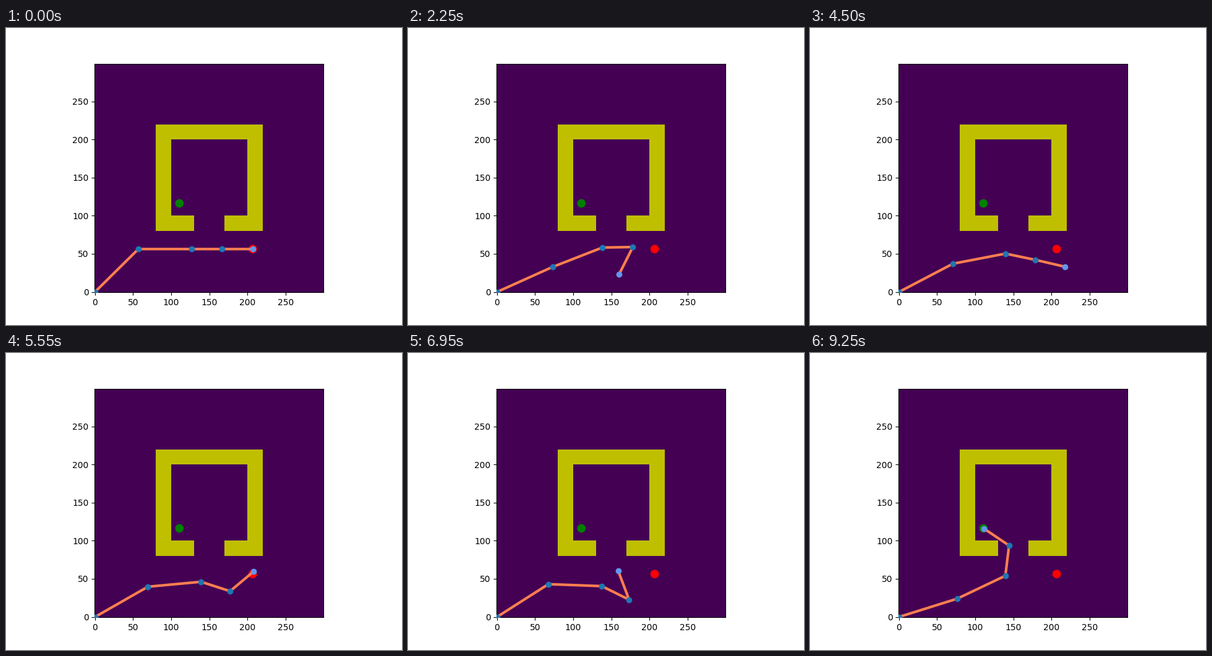
Animation, 640 px wide and 480 px high, one loop 9300 ms. Source, as a matplotlib script:

```python
import numpy as np
import matplotlib.pyplot as plt
from matplotlib.animation import FuncAnimation
from matplotlib.patches import Circle, Rectangle

FRAMES = 186
INTERVAL = 50
SIZE = 300
LINKS = np.array([80, 70, 40, 40])

# Waypoints in joint space: radians, each joint relative to the one before
WAYPOINTS = np.array([
    [0.78, -0.78, 0, 0],
    [0.407, -0.019, -0.370, -2.143],
    [0.572, -0.620, -0.424, 2.512],
    [0.304, 0.140, 1.005, 1.100],
])
GOAL = (110.8, 116.2)

# Distance travelled at each waypoint, so the arm moves at constant speed
steps = np.linalg.norm(np.diff(WAYPOINTS, axis=0), axis=1)
travel = np.concatenate([[0], np.cumsum(steps)])


def pose_at(frame):
    s = travel[-1] * frame / (FRAMES - 1)
    return [np.interp(s, travel, angles) for angles in WAYPOINTS.T]


def joints(pose):
    heading = np.cumsum(pose)
    x = np.append(0, np.cumsum(LINKS * np.cos(heading)))
    y = np.append(0, np.cumsum(LINKS * np.sin(heading)))
    return x, y


def box(x0, y0, x1, y1, color):
    ax.add_patch(Rectangle((x0, y0), x1 - x0, y1 - y0, fc=color, ec="none"))


def dot(center, color):
    ax.add_patch(Circle(center, 5, color=color))


fig, ax = plt.subplots(figsize=(6.4, 4.8), dpi=100)
ax.imshow(np.zeros((SIZE, SIZE)), origin="lower")
floor = plt.get_cmap("viridis")(0)

# Walled room with a doorway in its lower side
box(80, 80, 220, 220, "y")
box(100, 100, 200, 200, floor)
box(130, 80, 170, 100, floor)

start_x, start_y = joints(WAYPOINTS[0])
dot((start_x[-1], start_y[-1]), "red")
dot(GOAL, "green")

arm, = ax.plot([], [], color="coral", lw=3, zorder=3)
knots, = ax.plot([], [], "o", color="tab:blue", zorder=4)
tip, = ax.plot([], [], "o", color="cornflowerblue", zorder=4)
ax.set_xlim(-0.5, SIZE - 0.5)
ax.set_ylim(-0.5, SIZE - 0.5)


def update(frame):
    x, y = joints(pose_at(frame))
    arm.set_data(x, y)
    knots.set_data(x[:-1], y[:-1])
    tip.set_data(x[-1:], y[-1:])
    return arm, knots, tip


anim = FuncAnimation(fig, update, frames=FRAMES, interval=INTERVAL,
                     init_func=lambda: update(0), repeat=True, repeat_delay=0)
plt.show()
```
